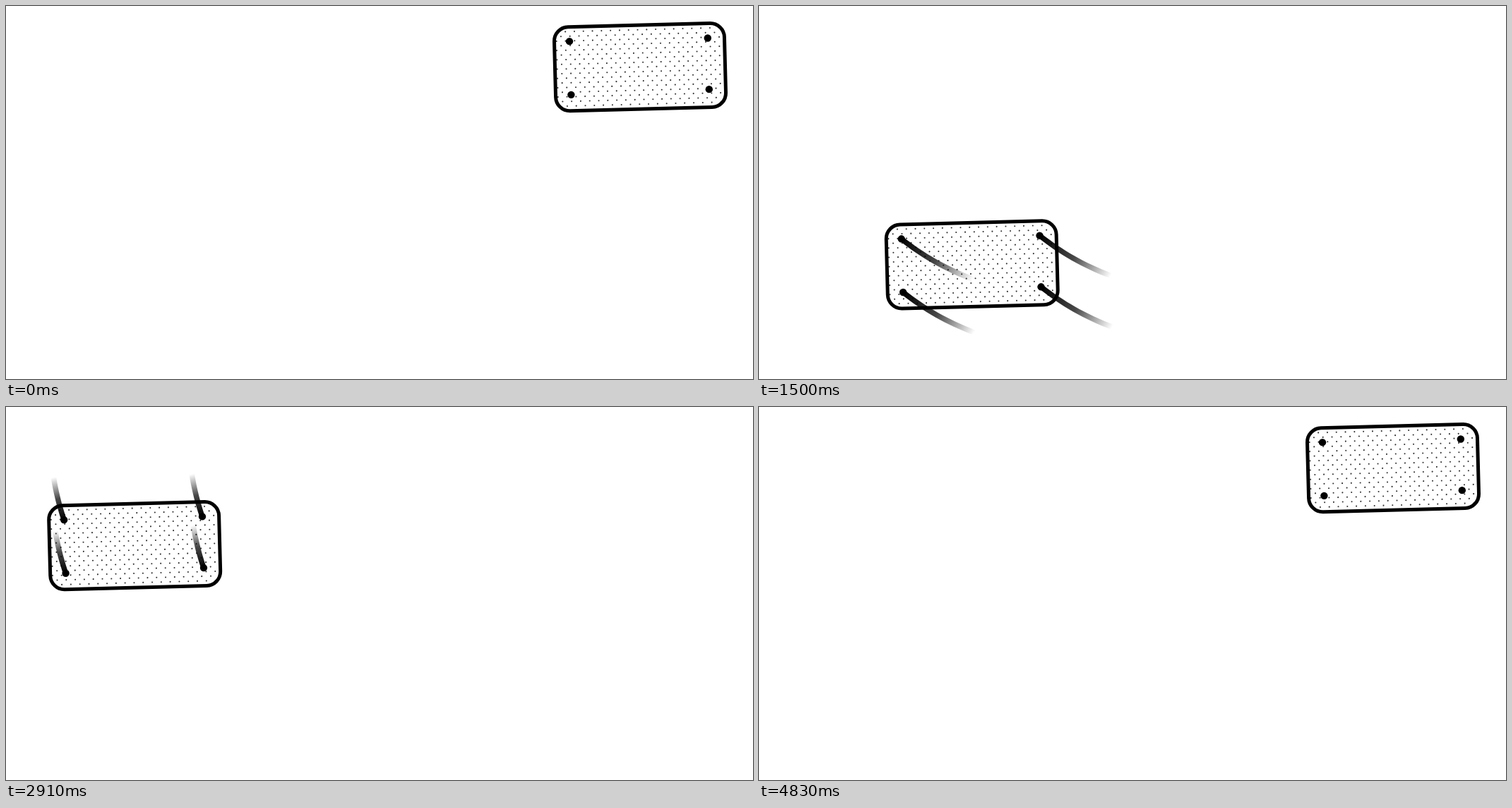
Recreate the animation shown at these times as an HTML page with a canvas. Size 1058 by 529 pixels, loop 4.86 s.

```html
<!DOCTYPE html>
<html lang="en">
<head>
<meta charset="utf-8">
<title>Swinging card</title>
<style>
  html, body { margin: 0; width: 100%; height: 100%; overflow: hidden; background: #fff; }
  canvas { display: block; }
</style>
</head>
<body>
<canvas width="1058" height="529"></canvas>
<script>
const ctx = document.querySelector('canvas').getContext('2d');
const LOOP = 4860, HALF = LOOP / 2, DELAY = 10, SWING = 2320, TRAIL = 160;
const PIVOT = { x: 530.5, y: 79.1 }, RADIUS = 367.6, EDGE = 1.18 * Math.PI / 180;
const CARD = { w: 241, h: 119, corner: 20, tilt: -1.5 * Math.PI / 180 };
// Pins relative to the card centre, in stage axes
const PINS = [[-100, -36.5], [95.8, -41.2], [-97.6, 39.2], [97.8, 31.5]];

// Card centre: an eased swing along an arc, there and back
function centre(ms) {
  const t = (ms % LOOP + LOOP) % LOOP;
  const u = Math.min(1, Math.max(0, (t % HALF - DELAY) / SWING));
  const eased = (1 - Math.cos(Math.PI * u)) / 2;
  const k = t < HALF ? eased : 1 - eased;
  const angle = EDGE + (Math.PI - 2 * EDGE) * k;
  return { x: PIVOT.x + RADIUS * Math.cos(angle), y: PIVOT.y + RADIUS * Math.sin(angle) };
}

function disc(x, y, r) {
  ctx.beginPath();
  ctx.arc(x, y, r, 0, 2 * Math.PI);
  ctx.fill();
}

function drawCard({ x, y }) {
  const { w, h, corner, tilt } = CARD;
  ctx.save();
  ctx.translate(x, y);
  ctx.rotate(tilt);
  ctx.beginPath();
  ctx.roundRect(-w / 2, -h / 2, w, h, corner);
  ctx.fillStyle = '#fff';
  ctx.fill();
  ctx.save();
  ctx.clip();
  ctx.fillStyle = '#333';
  for (let row = 0; row < 17; row++)
    for (let col = 0; col < 19; col++)
      disc(-117.3 + 12.8 * col + 6.4 * (row % 2), -53 + 6.6 * row, 1.05);
  ctx.restore();
  ctx.beginPath();
  ctx.roundRect(-w / 2, -h / 2, w, h, corner);
  ctx.lineWidth = 5;
  ctx.strokeStyle = '#000';
  ctx.stroke();
  ctx.restore();
}

function drawPin([dx, dy], path) {
  const head = path[0], tail = path[path.length - 1];
  ctx.save();
  ctx.translate(dx, dy);
  if (Math.hypot(head.x - tail.x, head.y - tail.y) > 0.5) {
    const fade = ctx.createLinearGradient(head.x, head.y, tail.x, tail.y);
    fade.addColorStop(0, 'rgba(0,0,0,1)');
    fade.addColorStop(0.5, 'rgba(0,0,0,.72)');
    fade.addColorStop(1, 'rgba(0,0,0,0)');
    ctx.strokeStyle = fade;
    ctx.lineWidth = 7.5;
    ctx.lineJoin = 'round';
    ctx.beginPath();
    path.forEach(p => ctx.lineTo(p.x, p.y));
    ctx.stroke();
  }
  ctx.fillStyle = '#000';
  disc(head.x, head.y, 5.2);
  ctx.restore();
}

function draw() {
  const now = performance.now();
  const path = Array.from({ length: 17 }, (_, i) => centre(now - TRAIL * i / 16));
  ctx.clearRect(0, 0, 1058, 529);
  drawCard(path[0]);
  PINS.forEach(pin => drawPin(pin, path));
  requestAnimationFrame(draw);
}
draw();
</script>
</body>
</html>
```
